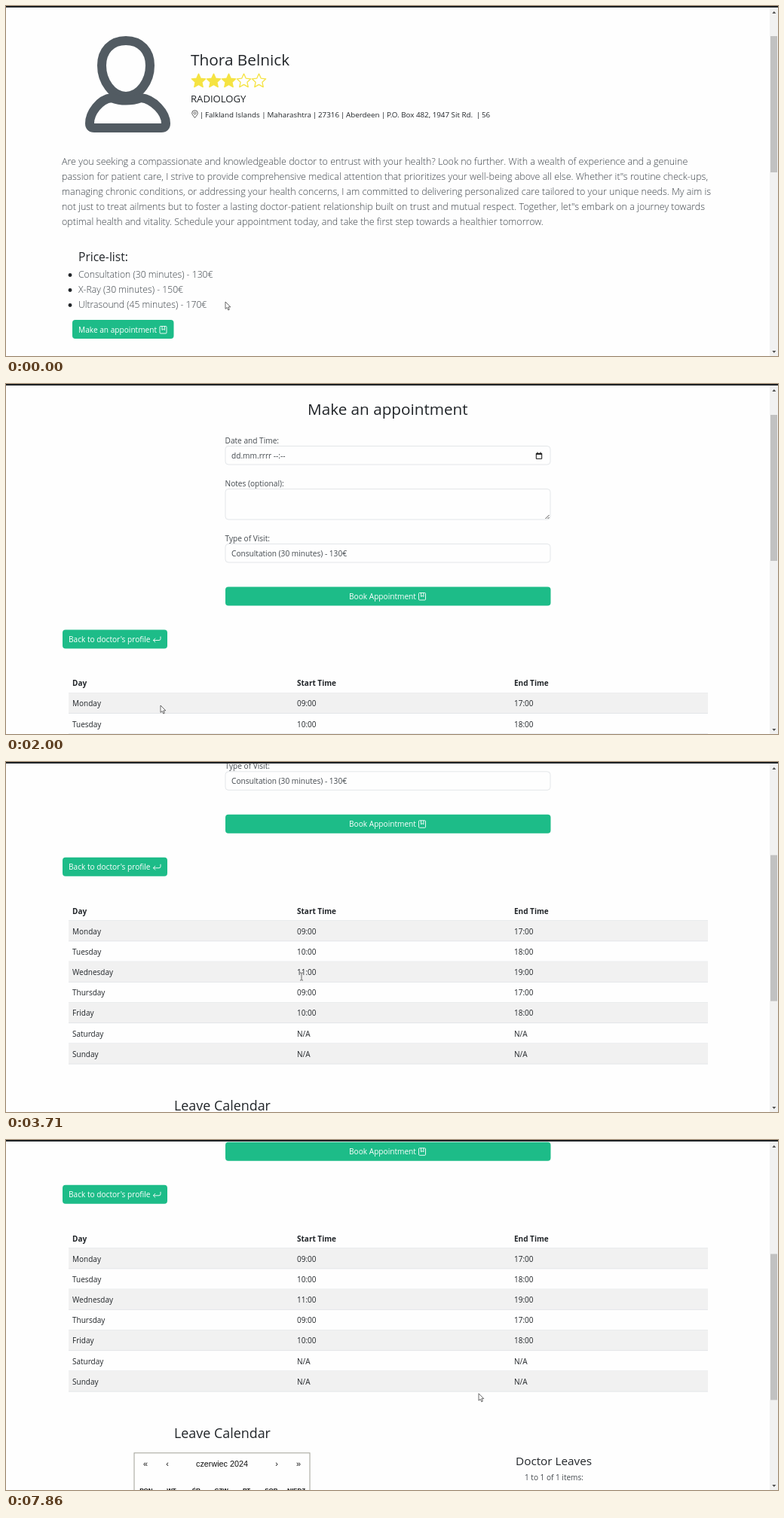
Recreate the animation shown at these times as an HTML page. Size 1024 by 465 pixels, loop 8000 ms.

```html
<!DOCTYPE html>
<html lang="en">
<head>
<meta charset="utf-8">
<title>Make an appointment</title>
<style>
  html, body { margin: 0; width: 100%; height: 100%; overflow: hidden; background: #fefefe; }
  svg { display: block; width: 100%; height: 100%; }
  text { font-family: "Open Sans", "Noto Sans", sans-serif; fill: #212529; white-space: pre; }
  .light { font-weight: 300; fill: #3a4147; }
  .soft { fill: #43494e; }
  .head { font-weight: 500; }
  .bold { font-weight: 700; }
  .mid { text-anchor: middle; }
  .arial { font-family: "Liberation Sans", Arial, sans-serif; fill: #111; }
  .btn { color: #fff; }
  .btn text { fill: currentColor; }
  .icon { fill: none; stroke: currentColor; stroke-width: .9; }
  .field { fill: #fefefe; stroke: #e3e6e9; }
  .cursor { fill: #fff; stroke: #444; stroke-width: .8; stroke-linejoin: round; }
</style>
</head>
<body>
<svg id="stage" viewBox="0 0 1024 465"></svg>
<script>
const GREEN = '#1dbc88';
const BODY = 10.15;

// cy is the middle of the capitals
const text = (x, cy, size, str, cls = '') =>
  `<text x="${x}" y="${(cy + size * 0.36).toFixed(2)}" font-size="${size}" class="${cls}">${str}</text>`;
const rect = (x, y, w, h, attrs) =>
  `<rect x="${x}" y="${y}" width="${w}" height="${h}" ${attrs}/>`;
const icon = (x, y, d) => `<path class="icon" transform="translate(${x} ${y})" d="${d}"/>`;

const BOOK = 'M1.5 .5h7a1 1 0 0 1 1 1v7.5a1 1 0 0 1-1 1h-7a1 1 0 0 1-1-1v-7.5a1 1 0 0 1 1-1zM3.5 .5v5l1.7-1.2 1.7 1.2v-5';
const RETURN = 'M10.5 1.5v3a2 2 0 0 1-2 2H1M3.6 3.7 .9 6.5 3.6 9.2';
const PIN = 'M4.5 10C2 7 .7 5.2 .7 3.8a3.8 3.6 0 0 1 7.6 0C8.3 5.2 7 7 4.5 10zM4.5 2.4a1.5 1.5 0 1 0 .01 0z';

function button(id, x, y, w, h, label, labelX, iconX, iconY, d) {
  return `<g id="${id}" class="btn">${rect(x, y, w, h, `rx="4" fill="${GREEN}"`)}` +
    text(labelX, y + h / 2 + 0.5, BODY, label) + icon(iconX, iconY, d) + '</g>';
}

function star(cx, cy, full) {
  const pts = Array.from({ length: 10 }, (_, i) => {
    const r = i % 2 ? 4.6 : 9.7, a = i * Math.PI / 5;
    return `${(cx + r * Math.sin(a)).toFixed(1)},${(cy - r * Math.cos(a)).toFixed(1)}`;
  });
  return `<polygon points="${pts.join(' ')}" fill="${full ? '#f5e342' : 'none'}" stroke="#f5e342" stroke-width="1.3" stroke-linejoin="round"/>`;
}

function profilePage() {
  const about = [
    'Are you seeking a compassionate and knowledgeable doctor to entrust with your health? Look no further. With a wealth of experience and a genuine',
    'passion for patient care, I strive to provide comprehensive medical attention that prioritizes your well-being above all else. Whether it"s routine check-ups,',
    'managing chronic conditions, or addressing your health concerns, I am committed to delivering personalized care tailored to your unique needs. My aim is',
    'not just to treat ailments but to foster a lasting doctor-patient relationship built on trust and mutual respect. Together, let"s embark on a journey towards',
    'optimal health and vitality. Schedule your appointment today, and take the first step towards a healthier tomorrow.'
  ];
  const prices = ['Consultation (30 minutes) - 130€', 'X-Ray (30 minutes) - 150€', 'Ultrasound (45 minutes) - 170€'];
  const address = [[264, 'Falkland Islands'], [346.5, 'Maharashtra'], [414, '27316'], [451, 'Aberdeen'],
    [505, 'P.O. Box 482, 1947 Sit Rd.'], [631, '56']];
  const avatar = `<g fill="none" stroke="#525b62" stroke-width="12" stroke-linejoin="round">
    <path d="M159 46C179 46 191 60 191 79C191 100 177 120 159 120C141 120 127 100 127 79C127 60 139 46 159 46Z"/>
    <path d="M140 122C124 124 111 142 111 156Q111 162 117 162H206Q212 162 212 156C212 142 196 124 179 122Q159 129 140 122Z"/></g>`;
  return avatar +
    text(245, 72, 20.8, 'Thora Belnick', 'head') +
    [0, 1, 2, 3, 4].map(i => star(255.5 + i * 20, 99.8, i < 3)).join('') +
    text(245, 123, 13.1, 'RADIOLOGY') +
    `<g color="#444">${icon(246, 138.5, PIN)}</g>` +
    address.map(([x, s]) => text(x - 4.5, 144, 9.8, '|', 'mid') + text(x, 144, 9.8, s)).join('') +
    about.map((s, i) => text(74, 206 + i * 20, 12.49, s, 'light')).join('') +
    text(96, 333, 15.6, 'Price-list:', 'head') +
    prices.map((s, i) => `<circle cx="85" cy="${357.5 + i * 20}" r="2.4" fill="#212529"/>` +
      text(96, 357 + i * 20, 12.2, s, 'light')).join('') +
    button('visit', 88, 417, 134.5, 25, 'Make an appointment', 96, 203.5, 425, BOOK);
}

function schedule() {
  const days = ['Monday', 'Tuesday', 'Wednesday', 'Thursday', 'Friday', 'Saturday', 'Sunday'];
  const starts = [9, 10, 11, 9, 10];
  const cols = [88, 386, 674];
  const hour = h => String(h).padStart(2, '0') + ':00';
  const row = (cells, cy, cls) => cells.map((s, i) => text(cols[i], cy, 10, s, cls)).join('');
  const rows = days.map((day, i) => {
    const y = 410.5 + i * 27.2, open = starts[i];
    return rect(83, y, 848, 27.2, `fill="${i % 2 ? 'none' : '#f1f1f1'}"`) +
      rect(83, y + 26.7, 848, 0.8, 'fill="#dfe2e5"') +
      row([day, open ? hour(open) : 'N/A', open ? hour(open + 8) : 'N/A'], y + 14.2);
  });
  return row(['Day', 'Start Time', 'End Time'], 397.7, 'bold') + rect(83, 410, 848, 0.7, 'fill="#dfe2e5"') + rows.join('');
}

function leaveCalendar() {
  const nav = [[185, '«'], [214, '‹'], [286.5, 'czerwiec 2024'], [359, '›'], [388, '»']];
  const week = ['PON.', 'WT.', 'ŚR.', 'CZW.', 'PT.', 'SOB.', 'NIEDZ.'];
  return text(223, 656, 17.9, 'Leave Calendar', 'head') +
    rect(170, 682.5, 233, 200, 'fill="none" stroke="#a0a096"') +
    nav.map(([x, s]) => text(x, 697, 10.8, s, 'arial mid')).join('') +
    week.map((s, i) => text(187 + i * 33.2, 732, 8, s, 'arial bold mid')).join('') +
    text(676, 693, 15.3, 'Doctor Leaves', 'head') +
    text(688, 715.5, 10.05, '1 to 1 of 1 items:', 'soft');
}

function bookingPage() {
  const field = (y, h) => rect(291, y + 0.5, 431, h, 'rx="4" class="field"');
  const picker = `<g transform="translate(702.5 90.5)" fill="none" stroke="#111"><path d="M.8 1.8h7.4v7H.8z"/>
    <path d="M.8 2.4h7.4" stroke-width="1.8"/><path d="M2.5 0v1.5M6.5 0v1.5"/></g>`;
  return text(400, 33.5, 20.7, 'Make an appointment', 'head') +
    text(290.5, 75, BODY, 'Date and Time:', 'soft') + field(82, 24.5) +
    text(299, 95.5, BODY, 'dd.mm.rrrr --:--', 'soft') + picker +
    text(290.5, 132, BODY, 'Notes (optional):', 'soft') + field(139, 40.5) +
    '<path d="M715.5 179l5-5M718.5 179l2-2" stroke="#555"/>' +
    text(290.5, 205, BODY, 'Type of Visit:', 'soft') + field(212, 24.5) +
    text(299, 225.5, BODY, 'Consultation (30 minutes) - 130€', 'soft') +
    button('book', 291, 269.5, 431.5, 25, 'Book Appointment', 455, 547, 277, BOOK) +
    button('back', 75, 326.5, 139, 25, 'Back to doctor\'s profile', 83, 194.5, 334, RETURN) +
    schedule() + leaveCalendar();
}

const cursors = {
  arrow: 'M0 0V9.4L2.2 7.5 3.8 11 5.3 10.3 3.8 6.9H6.8Z',
  hand: 'M-1 .8Q0 -.6 1 .8V4.6L5.5 5.4Q6.6 5.8 6.4 7.2L5.4 11.5H.2L-3 7.4Q-3.6 6 -2.8 6.1L-1 7.2Z',
  beam: 'M-2 -5H-.6L0 -4.4 .6 -5H2M0 -4.4V4.4M-2 5H-.6L0 4.4 .6 5H2'
};

const stage = document.getElementById('stage');
stage.innerHTML =
  `<g id="profile">${profilePage()}</g><g id="booking">${bookingPage()}</g>` +
  rect(1013, 0, 11, 465, 'fill="#f1f1f1"') +
  rect(1014, 40, 9, 181, 'id="thumb" fill="#c1c1c1"') +
  '<path d="M1016.3 10h5l-2.5-3zM1016.3 458h5l-2.5 3z" fill="#505050"/>' +
  rect(0, 0, 1024, 2, 'fill="#1e2124"') +
  `<g id="status">${rect(-3, 451, 154, 17, 'rx="2" fill="#202124"')}` +
  `<text x="3" y="461" font-size="7.6" style="fill:#f1f1f1">https://medical-appointments.pl/visit/48</text></g>` +
  '<path id="cursor" class="cursor"/>';

const $ = id => document.getElementById(id);
const STEP = 1000 / 7, LOOP = 8000;

// keys: [step, value, value...], linear in between
const path = [[0, 291, 393], [4, 262, 404], [6, 262, 404], [11, 205, 427], [14, 205, 427], [19, 363.5, 283.5],
  [21, 374, 283], [24, 390, 283], [26, 392, 285], [28, 391, 286], [34, 391, 286], [40, 627, 336.8]];
const scrolls = [[20, 0], [21, 16], [22, 48], [23, 76], [24, 111], [25, 152], [26, 199.7], [27, 245], [28, 266.7]];
const bookHover = [[18, 0], [19, 0.6], [20, 1], [21, 1], [22, 0.5], [23, 0]];
const visitHover = [[9, 0], [10, 0.5], [11, 1]];

function sample(keys, k) {
  const next = keys.findIndex(key => key[0] > k);
  if (next === 0) return keys[0].slice(1);
  if (next < 0) return keys[keys.length - 1].slice(1);
  const a = keys[next - 1], b = keys[next], f = (k - a[0]) / (b[0] - a[0]);
  return a.slice(1).map((v, i) => v + (b[i + 1] - v) * f);
}

// hovered buttons fade to dark text without a fill
function hover(id, [amount]) {
  const mix = to => Math.round(255 + (to - 255) * amount);
  $(id).style.color = `rgb(${mix(33)},${mix(37)},${mix(41)})`;
  $(id).firstChild.setAttribute('fill-opacity', 1 - amount);
}

function cursorKind(k) {
  if ((k >= 10 && k < 13) || (k >= 19 && k < 22)) return 'hand';
  return k >= 26 && k < 29 ? 'beam' : 'arrow';
}

function render(k) {
  const booking = k >= 13;
  const [scroll] = sample(scrolls, k), [x, y] = sample(path, k);
  $('profile').style.display = booking ? 'none' : '';
  $('booking').style.display = booking ? '' : 'none';
  $('booking').setAttribute('transform', `translate(0 ${-scroll})`);
  $('thumb').setAttribute('y', booking ? 41 + scroll * 0.414 : 40);
  $('thumb').setAttribute('height', booking ? 194 : 181);
  $('status').style.display = k >= 11 && !booking ? '' : 'none';
  hover('visit', sample(visitHover, k));
  hover('book', sample(bookHover, k));
  $('cursor').setAttribute('d', cursors[cursorKind(k)]);
  $('cursor').setAttribute('transform', `translate(${x} ${y})`);
}

let shown = -1;
function tick() {
  const k = Math.floor((performance.now() % LOOP + 4) / STEP) % 56;
  if (k !== shown) render(shown = k);
  requestAnimationFrame(tick);
}
tick();
</script>
</body>
</html>
```
